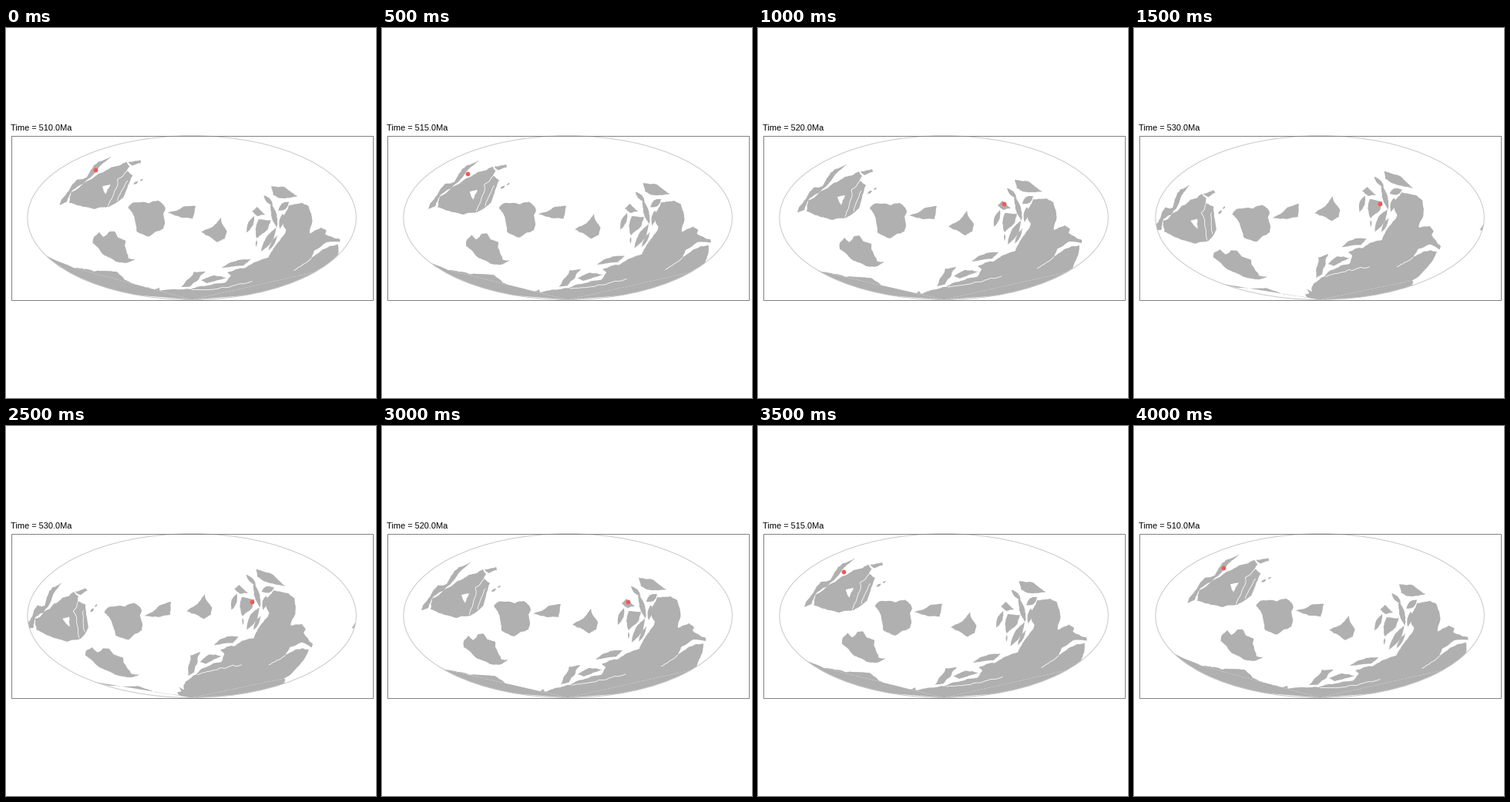
Recreate the animation shown at these times as a matplotlib script. Size 480x480 px, loop 4.5 s.

```python
import numpy as np
import matplotlib.pyplot as plt
from matplotlib.animation import FuncAnimation
from matplotlib.collections import LineCollection, PolyCollection
from matplotlib.patches import Ellipse, Rectangle

SIZE, DPI = 480, 100
PX = 72 / DPI
CX, CY, A, B = 241.1, 246.1, 213.2, 106.4
AGES = [510, 515, 520, 530, 540, 530, 520, 515, 510]
DOTS = {510: (116, 184), 515: (110.5, 189)}
LAST_DOT = (319, 228.3)
BASE_AGE = 520
rng = np.random.default_rng(4)

THETA = np.linspace(-np.pi / 2, np.pi / 2, 4001)
LAT = np.arcsin(np.clip((2 * THETA + np.sin(2 * THETA)) / np.pi, -1, 1))


def project(lon, lat):
    th = np.interp(lat, LAT, THETA)
    return np.column_stack([CX + A * lon / np.pi * np.cos(th), CY - B * np.sin(th)])


def to_sphere(pts):
    """Stage pixels to unit vectors through the inverse Mollweide projection."""
    x, y = np.asarray(pts, float).T
    th = np.arcsin(np.clip((CY - y) / B, -0.9999, 0.9999))
    lon = np.clip((x - CX) / (A * np.cos(th)), -0.9999, 0.9999) * np.pi
    lat = np.interp(th, THETA, LAT)
    return np.column_stack([np.cos(lat) * np.cos(lon), np.cos(lat) * np.sin(lon), np.sin(lat)])


def fit_rotation(p, q):
    """Best rotation taking the landmarks p to q."""
    u, _, vt = np.linalg.svd(to_sphere(p).T @ to_sphere(q))
    d = np.sign(np.linalg.det(vt.T @ u.T))
    return vt.T @ np.diag([1, 1, d]) @ u.T


def rot_power(r, s):
    ang = np.arccos(np.clip((np.trace(r) - 1) / 2, -1, 1))
    if ang < 1e-9 or s == 0:
        return np.eye(3)
    k = (r - r.T) / (2 * np.sin(ang))
    return np.eye(3) + np.sin(s * ang) * k + (1 - np.cos(s * ang)) * k @ k


def ragged(a, b, rough=0.045):
    """Points from a up to b by midpoint displacement."""
    d = b - a
    length = np.hypot(*d)
    if length < 2 or length > 250:
        return [a]
    push = np.clip(rng.normal(0, rough), -0.08, 0.08) * min(length, 20)
    mid = (a + b) / 2 + push * np.array([-d[1], d[0]]) / length
    return ragged(a, mid, rough) + ragged(mid, b, rough)


def trace(flat, closed=True):
    pts = np.array(flat, float).reshape(-1, 2)
    if closed:
        pts = np.vstack([pts, pts[:1]])
    out = []
    for a, b in zip(pts[:-1], pts[1:]):
        out += ragged(a, b)
    return to_sphere(out + [pts[-1]])


def sliver(x0, y0, x1, y1, width):
    """Lens-shaped strip of land between two ends."""
    a, d = np.array([x0, y0]), np.array([x1 - x0, y1 - y0])
    side = np.array([-d[1], d[0]]) / np.hypot(*d) * width / 2
    s = np.array([0, 0.25, 0.5, 0.75, 1, 0.75, 0.5, 0.25])[:, None]
    sign = np.where(np.arange(8) < 4, 1, -1)[:, None]
    return trace(a + d * s + side * sign * np.sin(np.pi * s))


class Plate:
    """Shapes drawn at the base age; landmarks are (younger, base, older) triples."""

    def __init__(self, marks, land, slivers=(), gaps=(), cracks=()):
        young, base, old = np.array(marks, float).transpose(1, 0, 2)
        self.young = fit_rotation(base, young)
        self.old = fit_rotation(base, old)
        self.land = [trace(s) for s in land] + [sliver(*s) for s in slivers]
        self.gaps = [trace(s) for s in gaps]
        self.cracks = [trace(s, False) for s in cracks]

    def rotation(self, age):
        s = (age - BASE_AGE) / 10
        return rot_power(self.old, s) if s > 0 else rot_power(self.young, -s)


def place(vecs, rot, closed=True):
    """Turn a shape, project it, and repeat it across the map edge."""
    x, y, z = rot @ vecs.T
    lon = np.unwrap(np.arctan2(y, x))
    lat = np.arcsin(np.clip(z, -1, 1))
    if closed and abs(lon[-1] - lon[0]) > np.pi:
        lon = np.append(lon, [lon[-1], lon[0]])
        lat = np.append(lat, [-np.pi / 2] * 2)
    return [project(lon + k * 2 * np.pi, lat) for k in (-1, 0, 1)]


northwest = Plate(
    [((136, 167), (115, 177), (71, 204)), ((66, 229), (51, 239), (33.5, 264)),
     ((122, 236), (100, 249), (77, 279))],
    [[115, 177, 100, 183, 90, 194, 84, 205, 72, 207, 64, 218, 53, 233, 51, 239,
      60, 236, 67, 221, 89, 205, 101, 189],
     [131, 186, 135, 192, 132, 198, 140, 204, 137, 213, 131, 234, 124, 240, 115, 246,
      97, 249, 76, 243, 63, 238, 65, 224, 80, 213, 98, 201, 113, 193],
     [133, 186, 148, 183, 149, 187, 138, 191]],
    slivers=[(150, 210, 154, 207, 2), (142, 215, 148, 211, 3)],
    gaps=[[103, 219, 113, 217, 108, 230]],
    cracks=[[113, 245, 122, 218, 121, 210, 133, 197], [124, 238, 134, 211]])

west = Plate(
    [((160, 236), (145, 234), (127, 241)), ((183, 268), (171, 273), (160, 278))],
    [[145, 234, 151, 228, 172, 230, 184, 227, 191, 233, 193, 239, 190, 245, 192, 257,
      190, 264, 171, 273, 155, 265, 152, 245]])

middle = Plate(
    [((210, 240), (196, 244), (180, 247)), ((246, 231), (232, 231), (214, 228))],
    [[196, 243, 207, 240, 217, 233, 232, 231, 229, 248, 214, 248]])

centre = Plate(
    [((253, 265), (247, 258), (234, 241)), ((279, 246), (271, 237), (258, 218))],
    [[247, 258, 262, 249, 271, 237, 280, 254, 278, 264, 269, 269, 261, 264]])

southwest = Plate(
    [((115, 267), (107, 275), (109, 291)), ((167, 300), (162, 303), (167, 321))],
    [[106, 279, 112, 272, 118, 278, 125, 270, 131, 269, 137, 277, 147, 280, 147, 287,
      155, 303, 163, 303, 155, 309, 140, 309, 124, 302, 106, 287]])

islands = Plate(
    [((328, 234), (319, 224), (305, 209)), ((326, 270), (320, 264), (307, 243))],
    [[311, 230, 317, 224, 328, 234, 318, 236],
     [317, 253, 320, 240, 336, 241, 333, 253, 320, 265]],
    slivers=[(306, 258, 314, 236, 7), (320, 267, 320, 276, 2)])

south = Plate(
    [((393, 234), (383, 226), (373, 222)), ((433, 274), (420, 277), (397, 287)),
     ((244, 327), (243, 323), (242, 309))],
    [[82, 316, 100, 319, 127, 323, 148, 325, 160, 334, 184, 343, 205, 344, 209, 341,
      212, 345, 235, 338, 252, 331, 284, 323, 290, 313, 285, 309, 305, 303, 327, 291,
      334, 289, 341, 275, 351, 261, 354, 254, 348, 241, 357, 222, 374, 221, 383, 226,
      387, 240, 384, 262, 398, 256, 405, 261, 403, 266, 420, 275, 420, 279, 404, 277,
      388, 287, 384, 297, 400, 286, 417, 282, 416, 292, 408, 312],
     [232, 335, 235, 327, 243, 312, 257, 310, 249, 324, 242, 333],
     [254, 322, 268, 314, 286, 316, 262, 325],
     [277, 303, 296, 292, 312, 291, 304, 299],
     [333, 197, 351, 199, 369, 212, 349, 213, 336, 208]],
    slivers=[(323, 208, 336, 221, 6), (333, 218, 342, 250, 7), (357, 218, 343, 228, 9),
             (349, 232, 346, 252, 6), (341, 250, 324, 281, 9), (343, 260, 333, 280, 5)],
    cracks=[[384, 297, 362, 312], [246, 336, 316, 322]])

PLATES = [northwest, west, middle, centre, southwest, islands, south]

fig = plt.figure(figsize=(SIZE / DPI, SIZE / DPI), dpi=DPI, facecolor="white")
ax = fig.add_axes([0, 0, 1, 1])
ax.set(xlim=(0, SIZE), ylim=(SIZE, 0))
ax.axis("off")

globe = Ellipse((CX, CY), 2 * A, 2 * B, fc="none", ec="#c8c8c8", lw=PX, zorder=4)
ax.add_patch(globe)
ax.add_patch(Rectangle((6.5, 139.5), 469, 213, fc="none", ec="#808080", lw=PX, zorder=5))
land = PolyCollection([], facecolors="#b0b0b0", linewidths=0, zorder=1)
gaps = PolyCollection([], facecolors="white", linewidths=0, zorder=2)
cracks = LineCollection([], colors="white", linewidths=0.8 * PX, zorder=3)
for layer in (land, gaps, cracks):
    ax.add_collection(layer, autolim=False)
    layer.set_clip_path(globe)
dot, = ax.plot([], [], "o", ms=5.8 * PX, color="#f05858", mew=0, zorder=6)
title = ax.text(6.3, 133, "", family="Liberation Sans", size=11 * PX, color="black",
                va="baseline")


def draw(i):
    age = AGES[i]
    fills, holes, lines = [], [], []
    for plate in PLATES:
        rot = plate.rotation(age)
        for s in plate.land:
            fills += place(s, rot)
        for s in plate.gaps:
            holes += place(s, rot)
        for s in plate.cracks:
            lines += place(s, rot, False)
    land.set_verts(fills)
    gaps.set_verts(holes)
    cracks.set_segments(lines)
    x, y = DOTS.get(age, LAST_DOT)
    dot.set_data([x], [y])
    title.set_text(f"Time = {age:.1f}Ma")
    return land, gaps, cracks, dot, title


anim = FuncAnimation(fig, draw, frames=len(AGES), interval=500, repeat=True, repeat_delay=0)
plt.show()
```
